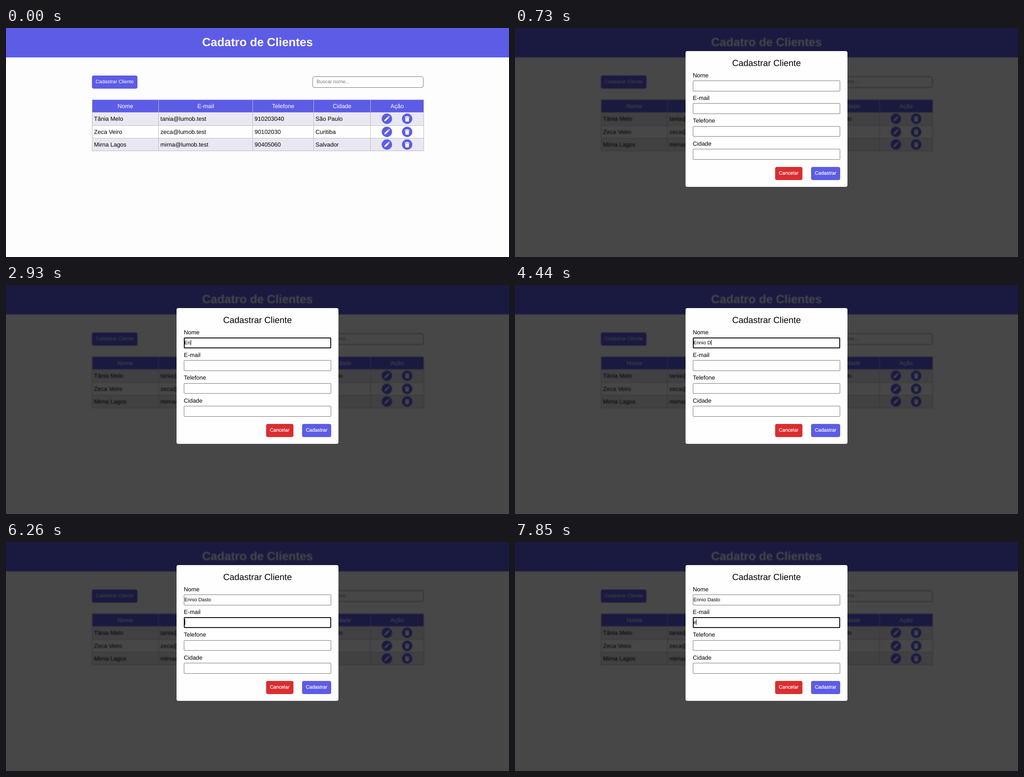
Write an HTML page that moves like this. It is 1106 px wide and 506 px high and loops after 8000 ms.

```html
<!DOCTYPE html>
<html lang="pt-BR">
<head>
<meta charset="utf-8">
<title>Cadastro</title>
<style>
  :root { --main: #5d5ce6; --dark: #3930dc; }
  * { box-sizing: border-box; margin: 0; padding: 0; }
  html, body { width: 100%; height: 100%; overflow: hidden; }
  body {
    position: relative; background: #fdfdfd; color: #000;
    font: 12.955px/15px "Liberation Sans", Arial, sans-serif;
    text-rendering: geometricPrecision; white-space: nowrap;
  }
  header {
    position: absolute; inset: 0 0 auto; height: 65px; background: var(--main);
    color: #fff; font: bold 25.91px/65px "Liberation Sans", Arial, sans-serif; text-align: center;
  }
  .btn {
    position: absolute; height: 28.5px; border-radius: 4px; background: var(--main);
    color: #fff; font-size: 10.8px; line-height: 28.5px; text-align: center;
  }
  .new { left: 189px; top: 105px; width: 100px; }
  .new.hover { background: var(--dark); }
  .search {
    position: absolute; left: 674px; top: 107px; width: 243.5px; height: 25px;
    border: 1px solid #767676; border-radius: 4px; background: #fff;
    padding-left: 8px; color: #757575; font-size: 10.8px; line-height: 23px;
  }
  table {
    position: absolute; left: 189px; top: 158px; width: 729px;
    border-collapse: collapse; table-layout: fixed;
  }
  tr { height: 28.33px; background: #fefefe; }
  tr:nth-child(even) { background: #e9e8f2; }
  tr:first-child { background: var(--main); color: #fff; }
  th, td { border: 1px solid #bbbbc3; padding: 0 3.6px; vertical-align: middle; }
  th { font-weight: normal; text-align: center; }
  td { text-align: left; }
  td svg { display: block; width: 68px; height: 23px; margin: 0 auto; }
  .overlay { position: absolute; inset: 0; background: rgba(0, 0, 0, .72); backdrop-filter: blur(.9px); }
  .modal { position: absolute; left: 375px; top: 51px; width: 356px; height: 299.5px; background: #fefefe; border-radius: 4px; }
  .overlay h2 {
    position: absolute; left: 375px; top: 67px; width: 356px;
    font-weight: normal; font-size: 19.43px; line-height: 22px; text-align: center;
  }
  .field { position: absolute; left: 391px; top: calc(97px + 50.2px * var(--i)); width: 324px; }
  .box {
    position: absolute; left: 0; top: 19.2px; width: 324px; height: 23.9px;
    border: 1px solid #767676; border-radius: 2px; background: #fff;
    padding-left: .3px; font-size: 10.8px; line-height: 22px; white-space: pre;
  }
  .focus { outline: 2px solid #101010; outline-offset: -2px; }
  .caret { display: inline-block; width: 1px; height: 12px; margin-right: -1px; vertical-align: -2px; background: #000; }
  .typed:empty + .caret { margin-left: .5px; }
  .cancel { left: 572px; top: 307px; width: 59.5px; background: #db2d30; }
  .save { left: 651px; top: 307px; width: 64px; }
  .cancel, .save { -webkit-text-stroke: .2px #fff; }
</style>
</head>
<body>
<svg width="0" height="0" style="position:absolute">
  <symbol id="acts" viewBox="0 0 84 28.4">
    <g fill="#5d5ce6"><circle cx="14.2" cy="14.2" r="14.1"/><circle cx="69.2" cy="14.2" r="14.1"/></g>
    <path fill="#fff" transform="translate(6.2 6.2)" d="M1 15L2 10.8 10.2 2.6 13.4 5.8 5.2 14zM11.2 1.6l1-1q.8-.6 1.6 0l1.6 1.6q.6.8 0 1.6l-1 1z"/>
    <path fill="#fff" transform="translate(61.2 6.2)" d="M6 .8h4l.8 1.2h3.7v2h-13v-2h3.7zM2.6 5h10.8l-.8 9.4q-.1 1.2-1.3 1.2H4.7q-1.2 0-1.3-1.2z"/>
  </symbol>
</svg>

<header>Cadatro de Clientes</header>
<div class="btn new">Cadastrar Cliente</div>
<div class="search">Buscar nome...</div>
<table>
  <colgroup><col style="width:146px"><col style="width:207px"><col style="width:134px"><col style="width:125px"><col style="width:117px"></colgroup>
  <tbody>
    <tr><th>Nome</th><th>E-mail</th><th>Telefone</th><th>Cidade</th><th>Ação</th></tr>
  </tbody>
</table>

<div class="overlay" hidden>
  <div class="modal"></div>
  <h2>Cadastrar Cliente</h2>
  <div class="btn cancel">Cancelar</div>
  <div class="btn save">Cadastrar</div>
</div>

<script>
  const $ = s => document.querySelector(s);
  const LOOP = 8000, BLINK = 530, HOVER = 500, OPEN = 730;

  const clients = [
    ["Tânia Melo", "tania@lumob.test", "910203040", "São Paulo"],
    ["Zeca Veiro", "zeca@lumob.test", "90102030", "Curitiba"],
    ["Mirna Lagos", "mirna@lumob.test", "90405060", "Salvador"]
  ];
  $("tbody").insertAdjacentHTML("beforeend", clients.map(row =>
    "<tr>" + row.map(c => `<td>${c}</td>`).join("") +
    '<td><svg><use href="#acts"/></svg></td></tr>').join(""));

  // focus and blur times, text, and the time of each keystroke
  const fields = [
    { label: "Nome", from: 1110, to: 6260, text: "Ennio Dasto",
      keys: [2400, 2930, 3080, 3380, 3610, 3910, 4440, 4820, 4970, 5270, 5350], wake: 1490 },
    { label: "E-mail", from: 6260, to: LOOP, text: "e", keys: [7850] },
    { label: "Telefone" },
    { label: "Cidade" }
  ];

  fields.forEach((f, i) => {
    $(".overlay").insertAdjacentHTML("beforeend",
      `<div class="field" style="--i:${i}">${f.label}<div class="box"><span class="typed"></span><span class="caret"></span></div></div>`);
    const el = $(".overlay").lastElementChild;
    f.box = el.querySelector(".box");
    f.typed = el.querySelector(".typed");
    f.caret = el.querySelector(".caret");
  });

  function drawField(f, t) {
    const { from = Infinity, to = 0, text = "", keys = [], wake = from } = f;
    const active = t >= from && t < to;
    const count = keys.filter(k => k <= t).length;
    const value = text.slice(0, count);
    if (f.typed.textContent !== value) f.typed.textContent = value;
    // the caret's blink restarts at each keystroke
    const since = t - (count ? keys[count - 1] : wake);
    const lit = since < 0 || Math.floor(since / BLINK) % 2 === 0;
    f.box.classList.toggle("focus", active);
    f.caret.style.visibility = active && lit ? "visible" : "hidden";
  }

  const start = performance.now();
  function draw() {
    const t = (performance.now() - start) % LOOP;
    $(".new").classList.toggle("hover", t >= HOVER && t < OPEN);
    $(".overlay").hidden = t < OPEN;
    fields.forEach(f => drawField(f, t));
    requestAnimationFrame(draw);
  }
  draw();
</script>
</body>
</html>
```
